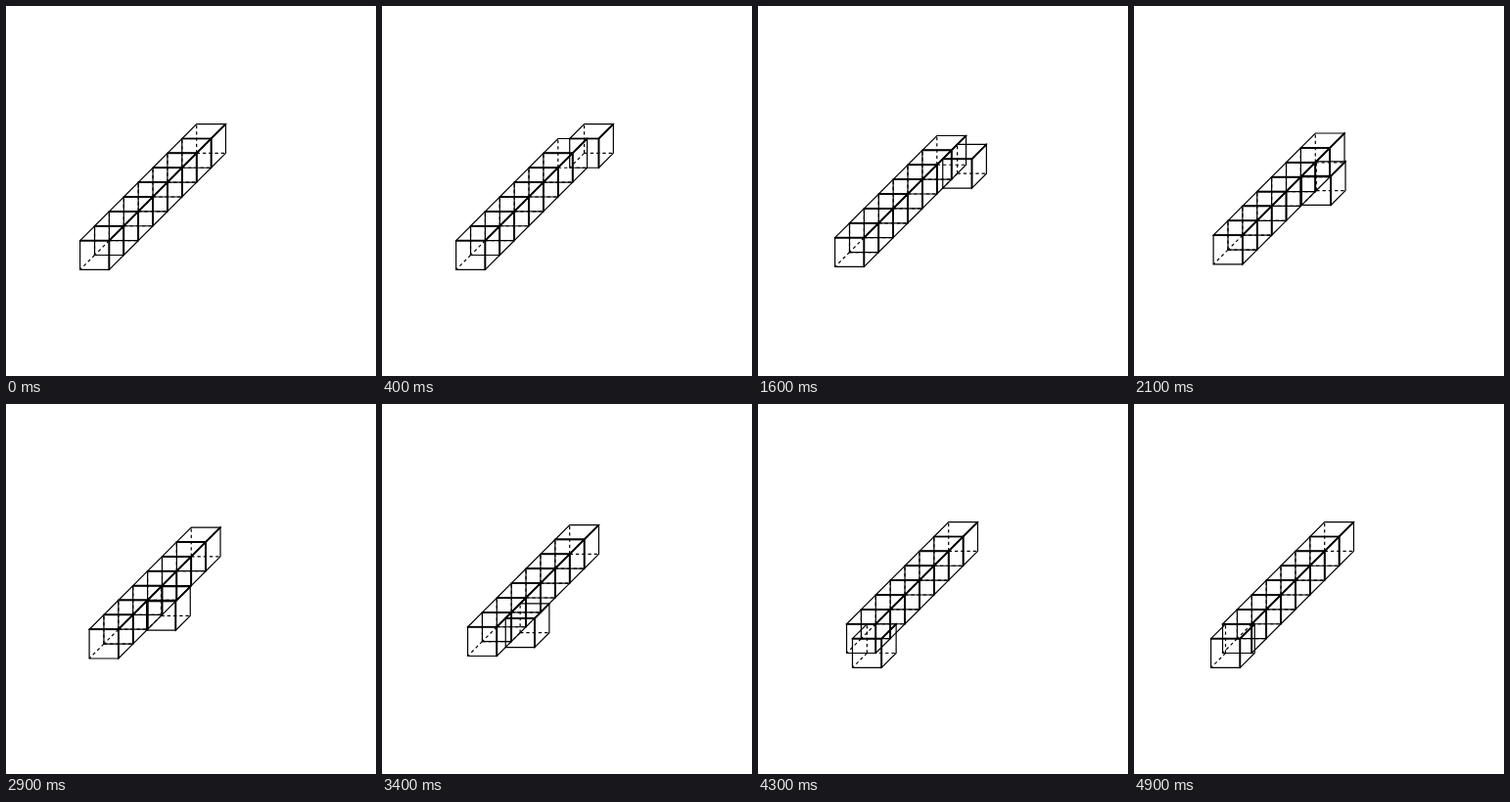
Recreate the animation shown at these times as an HTML page with a canvas. Size 378x378 px, loop 5000 ms.

```html
<!DOCTYPE html>
<html lang="en">
<head>
<meta charset="utf-8">
<title>Sliding cubes</title>
<style>
  html, body { margin: 0; width: 100%; height: 100%; overflow: hidden; background: #fff; }
  canvas { display: block; width: 378px; height: 378px; }
</style>
</head>
<body>
<canvas id="stage"></canvas>
<script>
const SIZE = 378, LOOP = 5000, STEP = 100;
const COUNT = 8;
const DEPTH = 14.88, EDGE = DEPTH * 2;
const LEFT = 75.66, TOP = 269.4 - EDGE;
const THIN = 1.2, THICK = 1.75;

const canvas = document.getElementById('stage');
const ctx = canvas.getContext('2d');
const ratio = window.devicePixelRatio || 1;
canvas.width = canvas.height = SIZE * ratio;
ctx.scale(ratio, ratio);
ctx.strokeStyle = '#000';

function face(...points) {
  ctx.beginPath();
  points.forEach(([x, y]) => ctx.lineTo(x, y));
  ctx.closePath();
  ctx.stroke();
}

function spokes(from, ends, width, dash = []) {
  ctx.lineWidth = width;
  ctx.setLineDash(dash);
  for (const end of ends) {
    ctx.beginPath();
    ctx.moveTo(...from);
    ctx.lineTo(...end);
    ctx.stroke();
  }
  ctx.setLineDash([]);
}

// slot: place along the row, 0 is nearest; side: shift right in cube widths
function cube(slot, side = 0) {
  const x = LEFT + slot * DEPTH + side * EDGE;
  const y = TOP - slot * DEPTH;
  const r = x + EDGE, b = y + EDGE;
  const back = (px, py) => [px + DEPTH, py - DEPTH];
  spokes(back(x, b), [[x, b], back(x, y), back(r, b)], THIN, [3.3, 2.95]);
  ctx.lineWidth = THIN;
  face([x, y], [r, y], [r, b], [x, b]);
  face([x, y], back(x, y), back(r, y), [r, y]);
  face([r, y], back(r, y), back(r, b), [r, b]);
  // edges shared by two visible faces look heavier
  spokes([r, y], [[x, y], [r, b], back(r, y)], THICK);
}

function draw(time) {
  const t = Math.floor((time % LOOP) / STEP) * STEP;
  const out = Math.min(t / 1000, 1);
  const slide = Math.min(Math.max((t - 1000) / 3000, 0), 1);
  const back = Math.max((t - 4000) / 1000, 0);

  ctx.fillStyle = '#fff';
  ctx.fillRect(0, 0, SIZE, SIZE);
  for (let i = COUNT - 2; i >= 0; i--) cube(i + slide);
  cube((COUNT - 1) * (1 - slide), out - back);
}

let start;
function tick(now) {
  start ??= now;
  draw(now - start);
  requestAnimationFrame(tick);
}
draw(0);
requestAnimationFrame(tick);
</script>
</body>
</html>
```
